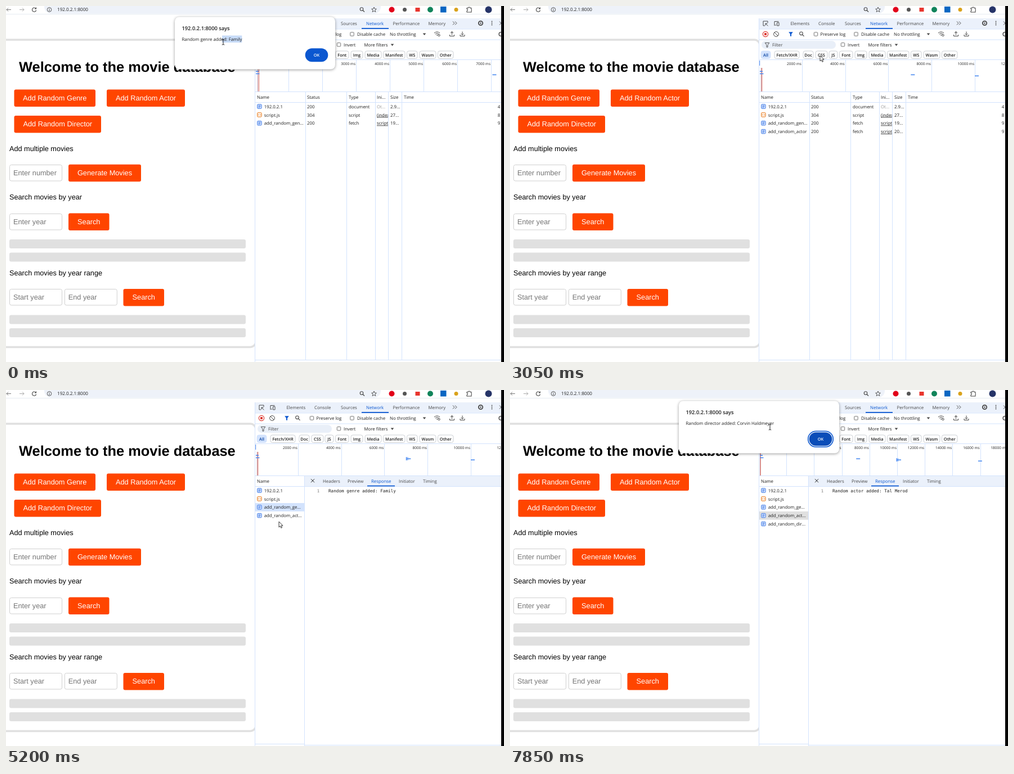
Write an HTML page with a canvas that moves like this. It is 885 px wide and 633 px high and loops after 7990 ms.

```html
<!DOCTYPE html>
<html lang="en">
<head>
<meta charset="utf-8">
<title>Movie database demo</title>
<style>
html, body { margin: 0; width: 100%; height: 100%; overflow: hidden; background: #fff; }
canvas { display: block; }
</style>
</head>
<body>
<canvas id="stage" width="885" height="633"></canvas>
<script>
const ctx = document.getElementById('stage').getContext('2d');
ctx.textRendering = 'geometricPrecision';

const LOOP = 7990, STEP = 130;
const UI = '"Open Sans", sans-serif', PAGE = '"Liberation Sans", sans-serif', MONO = '"DejaVu Sans Mono", monospace';
const INK = '#1f1f1f', ICON = '#474747', BLUE = '#0b57d0', LINE = '#d3e3fd', ORANGE = '#ff4500', BAR = '#ebf1fb';
const HOST = '192.0.2.1', ORIGIN = HOST + ':8000';
const GENRE = 'Random genre added: Family';
const ACTOR = 'Random actor added: Tal Merod';
const DIRECTOR = 'Random director added: Corvin Haldmeyer';

// Pointer path: time, x, y
const POINTER = [
  [20, 386, 64], [540, 551, 88], [670, 551, 88], [1190, 264, 163], [1580, 264, 163],
  [1990, 446, 59], [2350, 393, 59], [2500, 393, 59], [2890, 551, 88], [3020, 551, 88],
  [3560, 535, 180], [3940, 490, 206], [4330, 490, 206], [4590, 492, 210], [4770, 492, 210],
  [5200, 485, 234], [5330, 485, 222], [5600, 485, 222], [5860, 478, 226],
  [6520, 172.5, 197.5], [6650, 134, 208], [7060, 134, 208], [7850, 462, 66]
];
const DIALOGS = [
  { from: 0, to: 670, text: GENRE, select: 0, selectEnd: 0 },
  { from: 1580, to: 3020, text: ACTOR, select: 2100, selectEnd: 2350 },
  { from: 7060, to: LOOP, text: DIRECTOR, select: Infinity }
];
const REQUESTS = [
  { name: HOST, status: 200, type: 'document', by: 'Ot...', size: '2.9...', ms: 4, from: 0 },
  { name: 'script.js', status: 304, type: 'script', by: '(index)', size: '27...', ms: 8, from: 0 },
  { name: 'add_random_gen...', short: 'add_random_ge...', status: 200, type: 'fetch', by: 'script', size: '19...', ms: 9, from: 0, start: 7040 },
  { name: 'add_random_actor', short: 'add_random_act...', status: 200, type: 'fetch', by: 'script', size: '20...', ms: 9, from: 1450, start: 10000 },
  { name: 'add_random_dir...', short: 'add_random_dir...', status: 200, type: 'fetch', by: 'script', size: '20...', ms: 9, from: 6940, start: 15850 }
];

function rect(x, y, w, h, fill) {
  ctx.fillStyle = fill;
  ctx.fillRect(x, y, w, h);
}
function box(x, y, w, h, r, fill, stroke, width = 1) {
  ctx.beginPath();
  ctx.roundRect(x, y, w, h, r);
  paint(fill, stroke, width);
}
function circle(x, y, r, fill, stroke, width = 1) {
  ctx.beginPath();
  ctx.arc(x, y, r, 0, Math.PI * 2);
  paint(fill, stroke, width);
}
function path(d, x, y, fill, stroke, width = 1) {
  ctx.save();
  ctx.translate(x, y);
  const p = new Path2D(d);
  ctx.lineJoin = 'round';
  if (fill) { ctx.fillStyle = fill; ctx.fill(p); }
  if (stroke) { ctx.strokeStyle = stroke; ctx.lineWidth = width; ctx.stroke(p); }
  ctx.restore();
}
function paint(fill, stroke, width) {
  if (fill) { ctx.fillStyle = fill; ctx.fill(); }
  if (stroke) { ctx.strokeStyle = stroke; ctx.lineWidth = width; ctx.stroke(); }
}
function text(str, x, y, { size = 7.85, color = INK, weight = 400, align = 'left', family = UI } = {}) {
  ctx.font = `${weight} ${size}px ${family}`;
  ctx.fillStyle = color;
  ctx.textAlign = align;
  ctx.fillText(str, x, y);
  return ctx.measureText(str).width;
}

function pointerAt(t) {
  let i = POINTER.findLastIndex(k => k[0] <= t);
  if (i < 0) i = 0;
  const [t0, x0, y0] = POINTER[i];
  const [t1, x1, y1] = POINTER[i + 1] || [LOOP, x0, y0];
  const n = Math.max(1, Math.round((t1 - t0) / STEP));
  const u = Math.max(0, Math.floor((t - t0) / (t1 - t0) * n + 1e-6) / n);
  const e = u * u * (3 - 2 * u);
  return { x: x0 + (x1 - x0) * e, y: y0 + (y1 - y0) * e };
}

function drawBrowserBar() {
  box(68, -12, 598, 25.5, 12, '#eef2f9');
  rect(0, 14, 885, 1, '#e6ebf2');
  path('M4 0H-4M-1 -3L-4 0L-1 3', 5, 6.5, null, '#777');
  path('M-4 0H4M1 -3L4 0L1 3', 28, 6.5, null, '#aaa');
  path('M3 -2A3.6 3.6 0 1 0 3.6 1M3.5 -4V-1.5H1', 50, 6.5, null, ICON, 1.1);
  circle(77, 6.5, 3.8, null, ICON, 0.9);
  rect(76.5, 6, 1, 2.8, ICON);
  rect(76.5, 4.2, 1, 1, ICON);
  text(ORIGIN, 91, 9.3, { size: 8.1 });
  magnifier(632, 5.5, ICON);
  path('M0 -4.5L1.3 -1.4L4.4 -1.2L2 .8L2.8 4L0 2.2L-2.8 4L-2 .8L-4.4 -1.2L-1.3 -1.4Z', 654, 6.5, null, ICON, 0.9);
  circle(685.5, 6.5, 5, '#e2001a');
  circle(708.5, 6.5, 3.5, '#555');
  box(727.5, 3, 8, 7, 0, '#e8352e');
  circle(754, 6.5, 5, '#11845b');
  box(772, 1, 10.5, 10.5, 0, '#0a66c2');
  circle(800, 6.5, 3.5, '#d9a21b');
  path('M-4 -3H-1.5A1.5 1.5 0 0 1 1.5 -3H4V0A1.5 1.5 0 0 1 4 2V4.5H-4V2A1.5 1.5 0 0 0 -4 -1Z', 823, 6.5, null, ICON, 1.1);
  circle(857.5, 6.5, 6, '#263468');
}

function magnifier(x, y, color) {
  circle(x, y, 2.8, null, color, 1.1);
  path('M2 2L5 5', x, y, null, color, 1.2);
}

function button(label, x, y, w) {
  box(x, y, w, 30.5, 3, ORANGE);
  text(label, x + w / 2, y + 19.4, { size: 12.75, color: '#fff', align: 'center', family: PAGE });
}
function input(label, x, y) {
  box(x, y, 93, 28.5, 3, '#fff', '#d0d0d0');
  text(label, x + 6.5, y + 18.4, { size: 12.7, color: '#757575', family: PAGE });
}

function drawPage() {
  box(-20, 60, 464, 546.5, 10, '#fff', '#e0e0e0', 3.4);
  text('Welcome to the movie database', 23, 117, { size: 25.4, weight: 700, color: '#000', family: PAGE });
  button('Add Random Genre', 14.5, 148.5, 144.5);
  button('Add Random Actor', 179, 148.5, 139);
  button('Add Random Director', 14.5, 195, 154.5);
  const heading = (str, y) => text(str, 6, y, { size: 12.7, color: '#000', family: PAGE });
  heading('Add multiple movies', 257.5);
  input('Enter number', 6.5, 282.5);
  button('Generate Movies', 111, 281.7, 129);
  heading('Search movies by year', 344);
  input('Enter year', 6.5, 369.5);
  button('Search', 111, 368.5, 72.5);
  heading('Search movies by year range', 478.7);
  input('Start year', 6.5, 503.5);
  input('End year', 104.3, 503.5);
  button('Search', 208.5, 503, 72.5);
  for (const y of [415, 438.5, 549.5, 573]) box(6, y, 420, 16, 3, '#e0e0e0');
}

function checkbox(x, y) { box(x - 3.2, y - 3.2, 6.4, 6.4, 1, '#fff', '#666', 0.9); }
function caret(x, y) { path('M-2.8 -1.6H2.8L0 2Z', x, y, ICON); }
function funnel(x, y, fill, stroke) { path('M-3.8 -3.8H3.8L1 0V3.8H-1V0Z', x, y, fill, stroke, 0.9); }

function drawTools() {
  rect(442, 22, 443, 611, '#fff');
  rect(442, 22, 443, 18.5, BAR);
  for (const y of [40.5, 59.5, 95]) rect(442, y, 443, 1, LINE);

  path('M-1 4H-4V-4H4V-1M0 0L4.5 4.5M0 0V3.5M0 0H3.5', 454, 31, null, ICON);
  path('M-4 3H0M-3 2V-3.5H4.5M1.5 -1.5H5V4H1.5Z', 473, 31, null, ICON);
  const tabs = { Elements: 498.5, Console: 548, Sources: 595, Network: 640, Performance: 687.5, Memory: 750.5 };
  for (const [name, x] of Object.entries(tabs)) text(name, x, 34, { color: name === 'Network' ? BLUE : ICON });
  rect(632, 39, 48, 1.8, BLUE);
  path('M-4 -3L-1 0L-4 3M0 -3L3 0L0 3', 798, 30.5, null, ICON);
  circle(843.5, 30.5, 3.7, null, ICON, 1.8);
  circle(843.5, 30.5, 1.2, ICON);
  for (const dy of [-3, 0, 3]) circle(863.5, 30.5 + dy, 0.9, ICON);
  path('M-3 -3L3 3M3 -3L-3 3', 880, 30.5, null, ICON);

  circle(454, 50, 4.6, null, '#dc362e', 1.2);
  rect(452, 48, 4, 4, '#dc362e');
  circle(473, 50, 4.4, null, ICON);
  path('M-3 -3L3 3', 473, 50, null, ICON);
  funnel(499, 50, BLUE);
  magnifier(517.5, 48.8, ICON);
  checkbox(543.5, 50);
  text('Preserve log', 551.5, 53);
  checkbox(615, 50);
  text('Disable cache', 624, 53);
  text('No throttling', 682, 53);
  caret(743.5, 50);
  path('M-5 -2Q0 -6 5 -2M-3 0Q0 -2.5 3 0M-1 2H1', 766, 50, null, ICON);
  circle(769.5, 52, 1.7, null, ICON);
  path('M0 2V-4M-2.5 -1.5L0 -4L2.5 -1.5M-4 1.5V4H4V1.5', 792.5, 49.5, null, ICON);
  path('M0 -4V2M-2.5 -.5L0 2L2.5 -.5M-4 1.5V4H4V1.5', 811, 49.5, null, ICON);
  circle(879.5, 50, 3.4, null, ICON, 1.4);

  box(447, 62, 132, 14, 7, '#e9eff8');
  funnel(457, 69.3, null, ICON);
  text('Filter', 466, 72.2, { color: ICON });
  checkbox(591.5, 68.7);
  text('Invert', 600, 72);
  text('More filters', 636.5, 72);
  caret(686.5, 69);

  const chips = [['All', 446, 463], ['Fetch/XHR', 470, 514], ['Doc', 521, 539], ['CSS', 543, 564],
    ['JS', 567, 582], ['Font', 585.5, 609], ['Img', 613, 634], ['Media', 638, 667], ['Manifest', 670.5, 709],
    ['WS', 712.5, 731], ['Wasm', 735, 764], ['Other', 767.5, 795]];
  for (const [label, x0, x1] of chips) {
    const on = label === 'All';
    box(x0, 80, x1 - x0, 13.5, 3.5, on ? LINE : '#fff', on ? LINE : '#c7cbd1', 0.9);
    text(label, (x0 + x1) / 2, 89.6, { size: 7.4, weight: 600, align: 'center', color: on ? '#0842a0' : INK });
  }
}

function drawTimeline(t, selected) {
  const [spacing, unit] = t < 1450 ? [60, 1000] : t < 6940 ? [76.8, 2000] : [49.2, 2000];
  for (let k = 1; k * spacing < 475; k++) {
    const x = 442 + k * spacing;
    rect(Math.round(x), 96, 1, 56, LINE);
    text(`${k * unit} ms`, x - 1, 105, { size: 6.5, align: 'right' });
  }
  const shift = 60 * unit / (spacing * 1000) - 1;
  rect(443, 97, 1.2, 9, '#6b9df0');
  rect(447 - shift * 2, 110, 1, 42, '#b58a9a');
  rect(449 - shift * 3, 110, 1, 42, '#dc6a5e');
  rect(444, 115.5, 5, 1.5, '#4285f4');
  rect(444, 119.7, 6.5, 1.5, '#4285f4');
  REQUESTS.forEach((r, i) => {
    if (!r.start || t < r.from + (i === 4 ? 120 : 0)) return;
    const x = 442 + r.start / unit * spacing, y = 117.5 + i * 2;
    if (i === selected) {
      rect(x - 2, y - 2.3, 5, 6, '#bcd4fa');
      rect(x - 1, y - 2, 1.2, 5.5, '#4285f4');
    }
    rect(x, y, 7, 1.6, '#4b8bf0');
  });
  rect(442, 152, 443, 1, LINE);
}

function drawTable(t, panel, selected) {
  const edge = panel ? 530.5 : 885;
  const headerHover = t >= 3430 && t < 3680;
  if (headerHover) rect(533, 153, 72.5, 18, '#e8e9eb');
  rect(442, 171, edge - 442, 1, LINE);
  text('Name', 446, 164.6);
  if (!panel) {
    const columns = { Status: 535, Type: 609, 'Ini...': 659, Size: 683, Time: 707 };
    for (const [name, x] of Object.entries(columns)) text(name, x, 164.6);
    for (const x of [532, 605, 656, 679, 703]) rect(x, 152, 1, 477, LINE);
  }
  REQUESTS.forEach((r, i) => {
    if (t < r.from) return;
    const y = 178.7 + i * 14.85, base = y + 3;
    if (i === selected) rect(443, y - 7.4, 87.5, 14.8, t < 6800 ? LINE : '#e0e0e0');
    const color = i === 1 ? '#e8710a' : '#3b78e7';
    box(446.7, y - 3.8, 7.4, 7.4, 1.2, i === 1 ? '#fff' : '#dfeafd', color, 1);
    path(i === 1 ? 'M-1 -1.5L-2.3 0L-1 1.5M1 -1.5L2.3 0L1 1.5' : 'M-2 -1.6H2M-2 0H2M-2 1.6H1', 450.4, y, null, color, 0.9);
    text(panel && r.short || r.name, 458.7, base);
    if (panel) return;
    text(r.status, 535, base);
    text(r.type, 609, base);
    ctx.save();
    ctx.beginPath();
    ctx.rect(656, y - 8, 23, 16);
    ctx.clip();
    const width = text(r.by, 659, base, { color: i ? INK : '#9a9a9a' });
    if (i) rect(659, base + 1, width, 0.8, INK);
    ctx.restore();
    text(r.size, 683, base);
    text(`${r.ms} ms`, 873.7, base);
  });
  rect(442, 629, edge - 442, 1, LINE);
}

function drawPanel(message) {
  rect(530, 152, 1, 481, LINE);
  rect(531, 153, 354, 18, BAR);
  rect(531, 171, 354, 1, LINE);
  rect(531, 631, 354, 1, LINE);
  path('M-3 -3L3 3M3 -3L-3 3', 545, 161.3, null, INK);
  const tabs = { Headers: 563, Preview: 607, Response: 649, Initiator: 698, Timing: 741 };
  for (const [name, x] of Object.entries(tabs)) text(name, x, 164.8, { color: name === 'Response' ? BLUE : ICON });
  rect(642, 169.7, 49, 1.7, BLUE);
  text('1', 557, 182.4, { size: 7.2, color: '#777', align: 'right', family: MONO });
  text(message, 573, 182.4, { size: 7.67, family: MONO });
}

function drawDialog(dialog, t) {
  ctx.save();
  ctx.shadowColor = 'rgba(0,0,0,.4)';
  ctx.shadowBlur = 5;
  ctx.shadowOffsetY = 1;
  box(300, 19.5, 285, 93, 8, '#fff');
  ctx.restore();
  text(ORIGIN + ' says', 312.5, 43.4, { size: 9.3, weight: 600 });
  const blurred = t >= dialog.select;
  if (blurred) {
    ctx.font = `400 7.85px ${UI}`;
    const end = 312.5 + ctx.measureText(dialog.text).width;
    const start = pointerAt(Math.min(t, dialog.selectEnd)).x - 2;
    if (start < end) rect(start, 52.5, end - start, 12.5, '#c8dcf8');
  }
  text(dialog.text, 312.5, 62);
  if (!blurred) box(529.7, 73.2, 44.6, 28, 14, '#fff', BLUE, 1.6);
  box(531.7, 75.2, 40.6, 24, 12, blurred ? BLUE : '#0b4db8');
  text('OK', 552, 90, { size: 7.3, weight: 600, color: '#fff', align: 'center' });
}

function drawPointer({ x, y }, dialog) {
  const inside = (x0, y0, x1, y1) => x >= x0 && x <= x1 && y >= y0 && y <= y1;
  if (dialog && inside(305, 50, 520, 70)) {
    path('M-2.2 -4.8Q0 -4.8 0 -3.6Q0 -4.8 2.2 -4.8M0 -3.6V3.8M-2.2 5Q0 5 0 3.8Q0 5 2.2 5', x, y, null, '#222');
  } else if (inside(179, 148, 318, 179) || inside(14, 195, 169, 226)) {
    path('M-1.3 .8Q0 -1 1.3 .8V5Q2.8 4.4 3.3 5.6Q4.8 5.2 5 6.5Q6.3 6.2 6.2 8V11L4.5 15H-1L-4 9.5Q-4.5 7.5 -1.3 9Z',
      x, y, '#fff', '#111', 1);
    path('M1.3 5V8M3.3 5.6V8M5 6.5V8.5', x, y, null, '#111', 0.7);
  } else {
    path('M0 0V10L2.3 7.9L3.9 11.4L5.6 10.6L4 7.2H7Z', x, y, '#fff', '#222', 0.9);
  }
}

function draw(t) {
  const dialog = DIALOGS.find(d => t >= d.from && t < d.to);
  const panel = t >= 4070;
  const selected = !panel ? -1 : t < 5460 ? 2 : 3;
  rect(0, 0, 885, 633, '#fff');
  drawBrowserBar();
  drawPage();
  drawTools();
  drawTimeline(t, selected);
  drawTable(t, panel, selected);
  if (panel) drawPanel(selected === 2 ? GENRE : ACTOR);
  rect(442, 22, 1, 611, LINE);
  if (dialog) drawDialog(dialog, t);
  drawPointer(pointerAt(t), dialog);
  rect(880, 0, 5, 633, '#000');
}

const began = performance.now();
function frame() {
  draw((performance.now() - began) % LOOP);
  requestAnimationFrame(frame);
}
frame();
</script>
</body>
</html>
```
